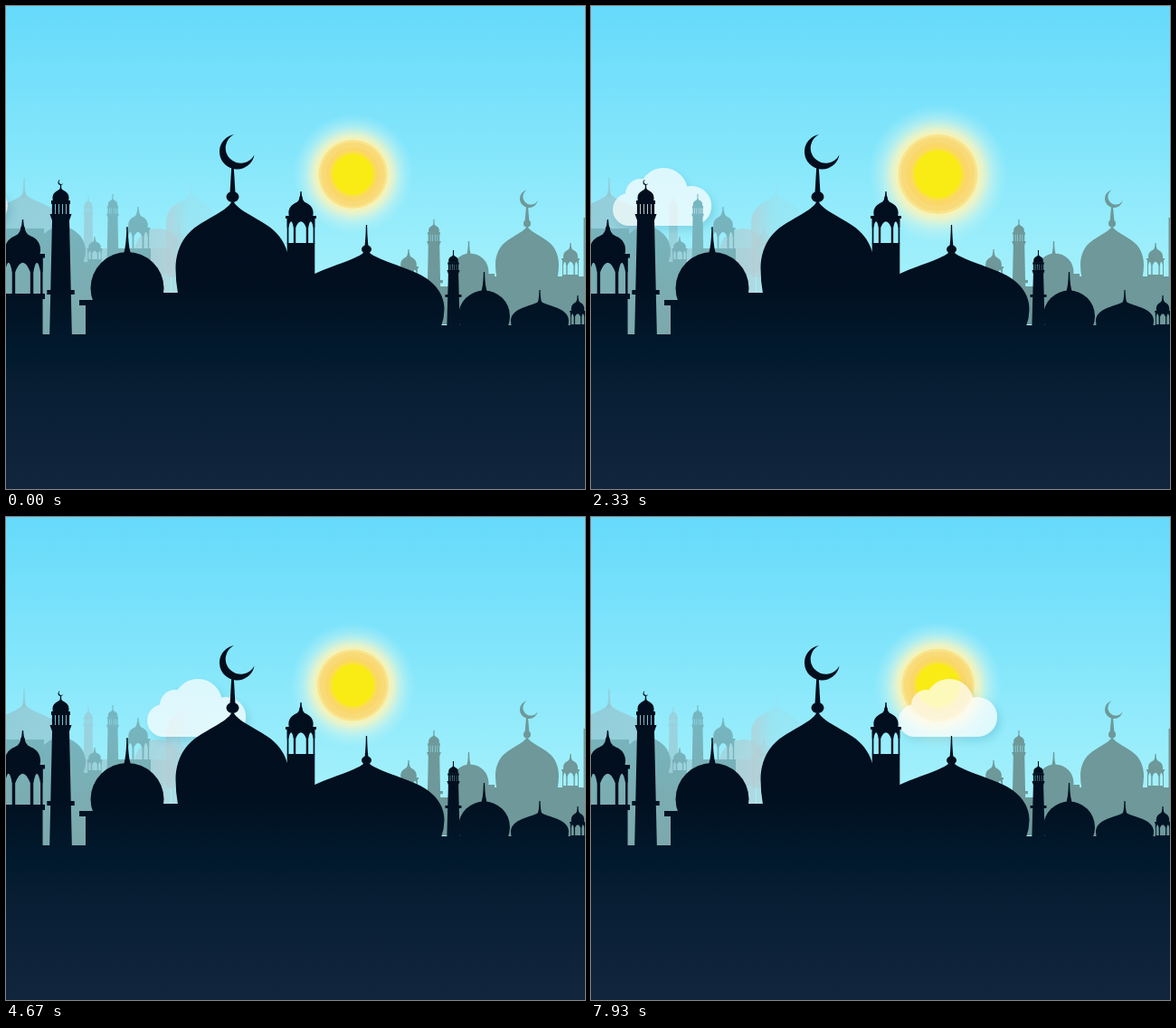
These frames come from a looping animation (640 by 534 pixels, 8 s). An HTML page:

```html
<!DOCTYPE html>
<html lang="en">
<head>
<meta charset="utf-8">
<title>Mosque skyline</title>
<style>
html, body { margin: 0; width: 100%; height: 100%; overflow: hidden; background: #66dbfd; }
svg { display: block; width: 100%; height: 100%; }
</style>
</head>
<body>
<svg viewBox="0 0 640 534" preserveAspectRatio="none">
  <defs>
    <linearGradient id="sky" x2="0" y2="1">
      <stop offset="0" stop-color="#66dafb"/>
      <stop offset=".3" stop-color="#84e6fb"/>
      <stop offset=".6" stop-color="#a8f2fb"/>
    </linearGradient>
    <linearGradient id="front" gradientUnits="userSpaceOnUse" x1="0" y1="140" x2="0" y2="534">
      <stop offset="0" stop-color="#010d1c"/>
      <stop offset=".42" stop-color="#010f1f"/>
      <stop offset=".6" stop-color="#01192d"/>
      <stop offset=".78" stop-color="#0a2036"/>
      <stop offset="1" stop-color="#11263c"/>
    </linearGradient>
    <linearGradient id="left" gradientUnits="userSpaceOnUse" x1="0" y1="205" x2="0" y2="363">
      <stop offset="0" stop-color="#74b8c3"/>
      <stop offset=".4" stop-color="#78b1b9"/>
      <stop offset="1" stop-color="#7da8ab"/>
    </linearGradient>
    <linearGradient id="haze" gradientUnits="userSpaceOnUse" x1="0" y1="0" x2="240" y2="0">
      <stop offset="0" stop-color="#92c6d1" stop-opacity=".8"/>
      <stop offset=".5" stop-color="#9ccad3" stop-opacity=".7"/>
      <stop offset=".76" stop-color="#b4ced4" stop-opacity=".65"/>
      <stop offset=".84" stop-color="#a4d4de" stop-opacity=".25"/>
      <stop offset="1" stop-color="#a4d4de" stop-opacity=".15"/>
    </linearGradient>
    <radialGradient id="glow">
      <stop offset=".55" stop-color="#fbf3ae"/>
      <stop offset=".64" stop-color="#f3f5c4" stop-opacity=".88"/>
      <stop offset=".8" stop-color="#dcf7e8" stop-opacity=".42"/>
      <stop offset="1" stop-color="#b8f3f6" stop-opacity="0"/>
    </radialGradient>
    <filter id="shade" x="-20%" y="-20%" width="150%" height="160%">
      <feDropShadow dx="4" dy="5" stdDeviation="4" flood-color="#10667c" flood-opacity=".22"/>
    </filter>
  </defs>
  <rect width="640" height="534" fill="url(#sky)"/>
  <g id="sun">
    <circle r="67" fill="url(#glow)"/>
    <circle r="38" fill="#f9e38c"/>
    <circle r="35.5" fill="#f8db78"/>
    <circle r="30" fill="#fad768"/>
    <circle r="25.5" fill="#fbdf4c"/>
    <circle r="22.6" fill="#f9ec14"/>
  </g>
  <g id="far" fill="url(#haze)"></g>
  <g id="cloud" opacity=".71" fill="#fff" filter="url(#shade)">
    <circle cx="-38" cy="225" r="18"/>
    <circle cx="-25" cy="208" r="17"/>
    <circle cy="206" r="27"/>
    <circle cx="31" cy="221" r="22"/>
    <path d="M-38 212H31V243H-38Z"/>
  </g>
  <g id="midLeft" fill="url(#left)"></g>
  <g id="midRight" fill="#6e9899"></g>
  <g id="near" fill="url(#front)"></g>
</svg>
<script>
const $ = id => document.getElementById(id);
let layer;

const path = d => {
  const p = document.createElementNS('http://www.w3.org/2000/svg', 'path');
  p.setAttribute('d', d);
  layer.append(p);
};
const box = (x1, y1, x2, y2) => path(`M${x1} ${y1}H${x2}V${y2}H${x1}Z`);
const ball = (x, y, rx, ry = rx) =>
  path(`M${x - rx} ${y}a${rx} ${ry} 0 1 1 ${2 * rx} 0a${rx} ${ry} 0 1 1 ${-2 * rx} 0Z`);

// Concave needle from tip down to base
const spike = (x, tip, base, w) => {
  const y = tip + (base - tip) * .8;
  path(`M${x - .6} ${tip}h1.2Q${x + w * .25} ${y} ${x + w} ${base}H${x - w}Q${x - w * .25} ${y} ${x - .6} ${tip}Z`);
};

// Pointed dome, widest at y = wide, cut at y = base
const onion = (x, top, r, wide, base) => {
  const h = wide - top, low = (base - top) / h;
  const at = (k, v) => `${x + k * r} ${top + v * h} `;
  path('M' + at(0, 0) +
    'C' + at(.03, .14) + at(.3, .22) + at(.6, .38) +
    'C' + at(.89, .53) + at(1, .77) + at(1, 1) +
    'Q' + at(1, (1 + low) / 2) + at(.96, low) +
    'L' + at(-.96, low) +
    'Q' + at(-1, (1 + low) / 2) + at(-1, 1) +
    'C' + at(-1, .77) + at(-.89, .53) + at(-.6, .38) +
    'C' + at(-.3, .22) + at(-.03, .14) + at(0, 0) + 'Z');
};

const crescent = (x, y, r) => {
  const a = .18 * r, b = .98 * r, q = .865 * r;
  path(`M${x - a} ${y - b}A${r} ${r} 0 1 0 ${x + b} ${y + a}A${q} ${q} 0 1 1 ${x - a} ${y - b}Z`);
};

// Domed kiosk on four columns; w is half the eave width
const kiosk = (x, tip, w, eave, floor, bottom) => {
  const h = eave - tip, t = Math.max(1.5, w * .18), gap = floor - eave - t;
  const X = k => x + k * w;
  spike(x, tip, tip + h * .42, w * .22);
  ball(x, tip + h * .26, w * .1);
  onion(x, tip + h * .3, w * .8, eave - h * .12, eave + 1);
  box(X(-1), eave, X(1), eave + t);
  const d = eave + t + gap * .36, top = eave + t - gap * .12;
  const arch = (from, to) => `H${X(from)}Q${X((from + to) / 2)} ${top} ${X(to)} ${d}`;
  path(`M${X(-.9)} ${eave}H${X(.9)}V${d}${arch(.8, .48)}${arch(.34, -.34)}${arch(-.48, -.8)}H${X(-.9)}Z`);
  for (const [a, b] of [[-.9, -.8], [-.48, -.34], [.34, .48], [.8, .9]]) box(X(a), eave, X(b), floor + 1);
  box(X(-.9), floor, X(.9), bottom);
};

// Slim tower; w is half the shaft width, band the height of its lower ring
const minaret = (x, tip, w, top, bottom, band) => {
  const k = w / 9.5;
  spike(x, tip, top + 4 * k, 2 * k);
  onion(x, top, 9 * k, top + 11 * k, top + 15 * k);
  box(x - 10.5 * k, top + 14 * k, x + 10.5 * k, top + 18 * k);
  for (let i = -2; i <= 2; i++) box(x + (i * 4 - 1.6) * k, top + 17 * k, x + (i * 4 + 1.6) * k, top + 31 * k);
  path(`M${x - 12 * k} ${top + 29 * k}H${x + 12 * k}L${x + w} ${top + 36 * k}L${x + w * 1.3} ${bottom}H${x - w * 1.3}L${x - w} ${top + 36 * k}Z`);
  if (band) box(x - w * 1.6, band, x + w * 1.6, band + 5 * k);
};

function drawFar() {
  layer = $('far');
  spike(20, 190, 211, 3);
  onion(20, 205, 52, 254, 363);
  minaret(91, 210, 4.5, 215, 300);
  spike(205, 192, 208, 2);
  onion(205, 206, 28, 240, 300);
  kiosk(191, 243, 9, 262, 275, 320);
  ball(168, 272, 26);
  box(72, 268, 182, 330);
}

function drawMidLeft() {
  layer = $('midLeft');
  ball(61, 271, 27);
  box(0, 283, 120, 363);
  box(36, 272, 86, 363);
  minaret(118, 208, 5.5, 213, 320);
  kiosk(146, 222, 13.5, 245, 268, 320);
  kiosk(98, 255, 8.5, 268, 280, 320);
  box(0, 246, 42, 363);
  box(112, 268, 160, 320);
}

function drawMidRight() {
  layer = $('midRight');
  kiosk(445, 269, 11, 288, 304, 352);
  minaret(473, 236, 6.2, 241, 352, 303);
  spike(511.5, 260, 276, 3);
  ball(513, 294, 20.5);
  box(495, 296, 540, 358);
  crescent(578, 213, 10);
  path('M575 222h2l1.5 17h-5Z');
  ball(576, 240.5, 4);
  onion(576, 242, 35, 286, 300);
  box(535, 299, 640, 358);
  kiosk(624, 262, 10, 279, 297, 352);
  box(638.5, 234, 640, 352);
  box(450, 310, 500, 352);
}

function drawNear() {
  layer = $('near');
  box(0, 363, 640, 534);
  box(88, 331, 480, 370);
  box(480, 353, 640, 370);

  kiosk(18.5, 236, 24.5, 274, 322, 364);
  box(-6, 318, 43, 324);
  crescent(60.5, 195, 3);
  minaret(60.5, 197, 9.5, 201, 364, 314);

  spike(134, 244, 276, 5);
  ball(134, 312, 40.5, 40);
  box(81, 325, 100, 331);
  box(97, 317, 400, 340);

  crescent(255.5, 161, 19.4);
  path('M249.3 177h2.4l1.8 30h-6Z');
  ball(250.5, 211, 7, 6);
  onion(250.5, 213, 63, 290, 318);
  kiosk(326, 205, 17, 232, 262, 340);

  spike(398.5, 242, 276, 4.5);
  ball(398.5, 269, 5.5, 4.5);
  onion(398.5, 268, 86, 335, 354);

  minaret(494.5, 270, 5.6, 275, 360, 319);
  spike(528.5, 294, 317, 4);
  ball(528.5, 343, 28.5);
  spike(590, 314, 329, 3);
  onion(590, 325, 32, 348, 355);
  kiosk(632, 320, 9, 337, 352, 360);
}

drawFar();
drawMidLeft();
drawMidRight();
drawNear();

const LOOP = 8000, PULSE = 4270;

function render(t) {
  $('cloud').setAttribute('transform', `translate(${-51.3 + t * .0564} 0)`);
  const u = 1 - Math.abs(1 - (t % PULSE) / PULSE * 2);
  const swell = (u + Math.sin(u * Math.PI / 2)) / 2;
  $('sun').setAttribute('transform', `translate(383.5 186) scale(${1 + .165 * swell})`);
}

let start;
function tick(now) {
  start ??= now;
  render((now - start) % LOOP);
  requestAnimationFrame(tick);
}
render(0);
requestAnimationFrame(tick);
</script>
</body>
</html>
```
